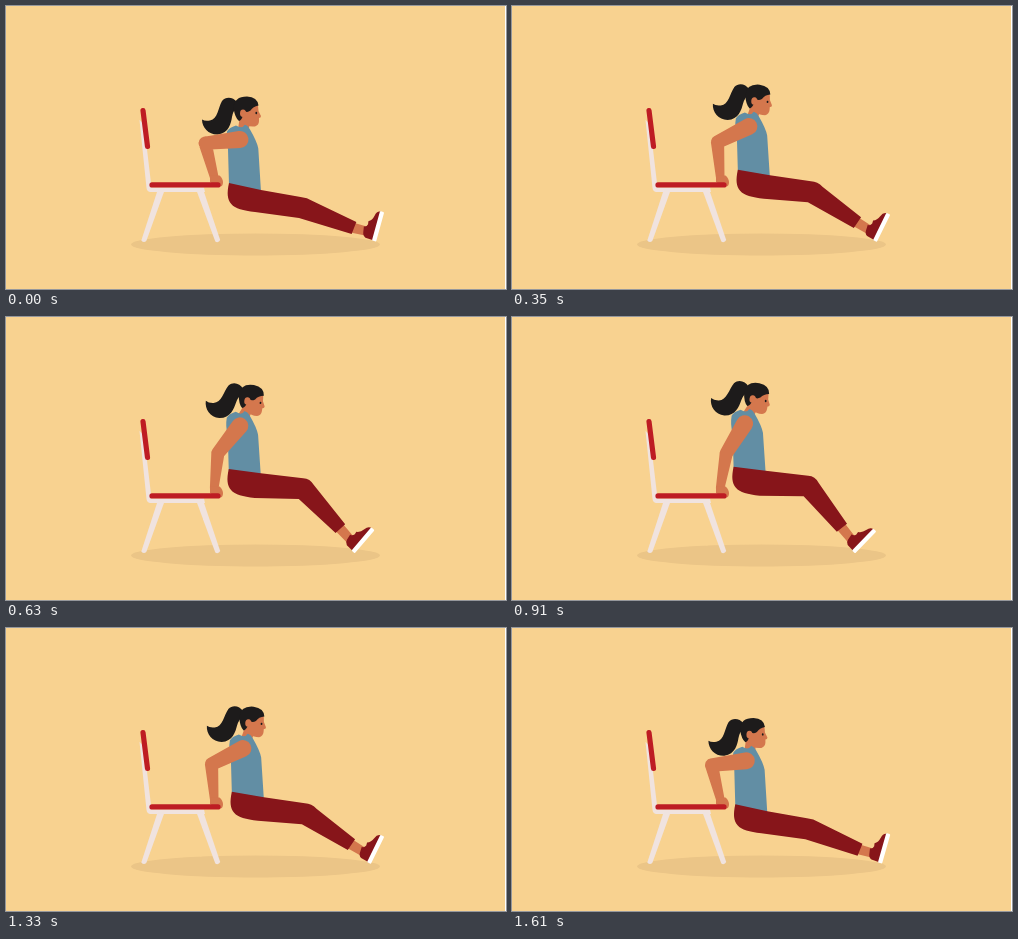
An HTML page that plays this animation: 500x283 px, repeating every 1.68 s.

```html
<!DOCTYPE html>
<html lang="en">
<head>
<meta charset="utf-8">
<title>Chair dips</title>
<style>
  html, body { margin: 0; width: 100%; height: 100%; overflow: hidden; background: #f8d290; }
  svg { display: block; width: 100%; height: 100%; }
  .white { fill: #f0e3df; }
  .skin { fill: #d4774d; }
  .hair { fill: #1d1b1b; }
  .shirt { fill: #628ea4; }
  .dark { fill: #87151a; }
</style>
</head>
<body>
<svg viewBox="0 0 500 283" preserveAspectRatio="none">
  <rect width="500" height="283" fill="#f8d290"/>
  <rect x="499" width="1" height="283" fill="#fff"/>
  <ellipse cx="249.5" cy="238.5" rx="124.5" ry="11" fill="#ebc587"/>

  <g class="white">
    <path d="M133.500 114L138 118L145.500 181.500L198 181.500L199 186L144 186Q141 185.500 140.500 182Z"/>
    <path d="M151.500 184.500H158.500L140.500 234.500Q138 237.500 135.300 234.500Z"/>
    <path d="M190.500 184.500H197.500L214.200 234Q212.500 237.300 209.300 235.500Z"/>
  </g>

  <path id="neck" class="skin"/>
  <path id="shirt" class="shirt"/>
  <path id="ankle" class="skin"/>
  <path id="pants" class="dark"/>
  <g id="foot">
    <path class="dark" d="M0 0L-9 -.5Q-12 -1.500 -12.500 -5L-13.500 -11Q-11 -10.500 -10 -14L-10.500 -17Q-7 -19 -6 -24Q-5 -29.500 -1 -29.500Z"/>
    <rect x="-2" y="-30" width="4.300" height="30.500" rx="1" fill="#fff"/>
  </g>
  <g id="head">
    <path class="hair" d="M-6 -11C-10 -16 -17 -17 -21 -12C-25 -5 -25 6 -33 7.500Q-38 8.500 -41 6.500C-41 15 -34 22 -25 21.500C-14 20 -12 10 -11 4Q-10 -2 -6 -6Z"/>
    <path class="skin" d="M-4 -10L14 -10Q15.500 -6 15.500 -2L18 3Q18 5 16 5L16 8Q16 12 12 13.500Q6 14 4 12L-3 10Z"/>
    <path class="hair" d="M15.500 -7.500Q10 -6.500 7.500 -2.500Q4 0 2 -2L0 2Q-1 7 -4 8Q-8 5 -9.500 -5Q-9 -16.500 4 -16.500Q14.500 -16 15.500 -7.500Z"/>
    <ellipse class="skin" cx="0" cy=".3" rx="3" ry="3.800"/>
    <ellipse class="hair" cx="13.300" cy="0" rx=".9" ry="1.200"/>
  </g>
  <path id="arm" class="skin"/>
  <path class="skin" d="M204 169.500L213.500 169.500Q217 172 217 177Q216.500 181 213.500 180.500L211 178Q207 178.500 204 176Z"/>
  <path d="M137 104.500L141.500 140.500M146 178.900H212" fill="none" stroke="#be1c23" stroke-width="5.200" stroke-linecap="round"/>
</svg>
<script>
const STEP = 70, COUNT = 24;
const WRIST = [208.2, 171], ARM = 35;

const $ = id => document.getElementById(id);
const add = (p, x, y) => [p[0] + x, p[1] + y];
const mix = (a, b, t) => [a[0] + (b[0] - a[0]) * t, a[1] + (b[1] - a[1]) * t];
const fmt = p => p[0].toFixed(2) + ' ' + p[1].toFixed(2);
const path = (s, ...pts) => s.map((part, i) => part + (pts[i] ? fmt(pts[i]) : '')).join('');
const put = (id, d) => $(id).setAttribute('d', d);
const place = (id, p, angle) => $(id).setAttribute('transform', `translate(${fmt(p)}) rotate(${angle.toFixed(2)})`);

// Tapered capsule between two circles.
function limb(a, ra, b, rb) {
  const dx = b[0] - a[0], dy = b[1] - a[1];
  const dir = Math.atan2(dy, dx), open = Math.acos((ra - rb) / Math.hypot(dx, dy));
  const edge = (c, r, s) => add(c, r * Math.cos(dir + s * open), r * Math.sin(dir + s * open));
  return path`M${edge(a, ra, 1)}L${edge(b, rb, 1)}`
    + `A${rb} ${rb} 0 0 0 ${fmt(edge(b, rb, -1))}`
    + `L${fmt(edge(a, ra, -1))}A${ra} ${ra} 0 1 0 ${fmt(edge(a, ra, 1))}Z`;
}

// Elbow of an arm with two equal bones, bent backwards.
function bend(a, b, len) {
  const dx = b[0] - a[0], dy = b[1] - a[1], d = Math.hypot(dx, dy);
  const h = Math.sqrt(Math.max(0, len * len - d * d / 4)) / d;
  return add(mix(a, b, .5), -dy * h, dx * h);
}

function turn(x, y, deg) {
  const a = deg * Math.PI / 180, c = Math.cos(a), s = Math.sin(a);
  return [x * c - y * s, x * s + y * c];
}

// swing runs 0 at the lowest dip to 1 at the top.
function draw(swing) {
  const lift = swing + .47 * swing * (1 - swing);
  const sway = 14.4 * lift * (1 - lift);
  const rise = (low, high) => add(mix(low, high, lift), sway, 0);

  const ear = rise([237, 107], [240.5, 81.5]);
  const s = rise([234, 133.5], [232.5, 106.5]);
  const w = rise([223, 177], [221.5, 149.5]);
  const knee = rise([300, 192], [302, 159]);
  const under = rise([293, 212], [291.5, 179]);
  const hip = add(w, 32, 7 - 3 * lift);
  const cuff = [348 - 18.7 * swing ** 2, 222 - 11.3 * lift];
  const heel = [368 - 27 * swing ** 1.7, 234.5];
  const foot = 15.4 + 29.2 * swing;

  put('neck', limb(add(ear, 1.5, 6), 5, add(s, 3.5, -9), 5.5));
  put('shirt', path`M${add(s, -4, -14)}Q${add(s, -11, -12)} ${add(s, -13, -8)}Q${add(s, -14.5, 0)} ${add(s, -12, 10)}L${add(w, 0, 2)}L${add(hip, 0, 2)}L${add(s, 18.3, 9)}Q${add(s, 17, 2)} ${add(s, 10, -10)}Q${add(s, 8, -14)} ${add(s, 5, -15)}Q${add(s, 2, -10)} ${add(s, -4, -14)}Z`);

  const mid = mix(knee, under, .5);
  const dir = Math.atan2(cuff[1] - mid[1], cuff[0] - mid[0]);
  const nx = 6.5 * Math.sin(dir), ny = -6.5 * Math.cos(dir);
  const top = add(cuff, nx, ny), low = add(cuff, -nx, -ny);
  put('pants', path`M${w}L${hip}L${mix(knee, hip, .12)}Q${add(knee, 1, -.5)} ${mix(knee, top, .14)}L${top}L${low}L${under}L${add(w, 26, 29)}C${add(w, 2, 26.5)} ${add(w, -4.5, 20)} ${w}Z`);

  const joint = turn(-9, -7, foot);
  put('ankle', limb(cuff, 5, add(heel, ...joint), 4.5));
  place('foot', heel, foot);
  place('head', ear, 10 * lift);

  const elbow = bend(s, WRIST, ARM);
  put('arm', limb(s, 8.5, elbow, 6.6) + limb(elbow, 6.6, WRIST, 4.3));
}

function tick() {
  const n = Math.floor(performance.now() / STEP) % COUNT;
  draw((1 - Math.cos(2 * Math.PI * n / COUNT)) / 2);
  requestAnimationFrame(tick);
}
tick();
</script>
</body>
</html>
```
